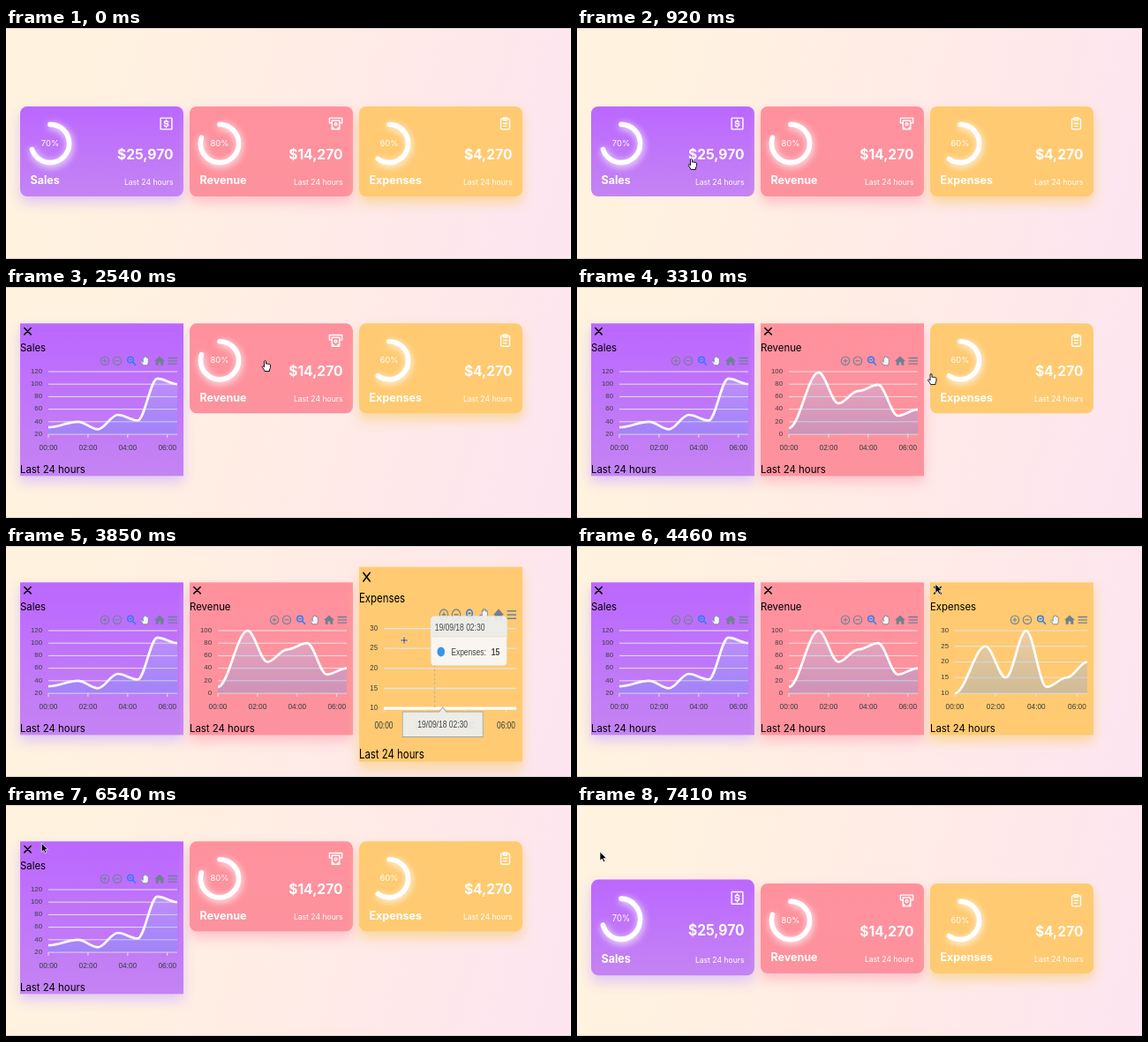
These frames come from a looping animation (640 by 262 pixels, 7.52 s). An HTML page:

```html
<!DOCTYPE html>
<html lang="en">
<head>
<meta charset="utf-8">
<title>Dashboard cards</title>
<style>
  html, body { margin: 0; width: 100%; height: 100%; overflow: hidden; }
  body { background: linear-gradient(106deg, #fff2df 16%, #ffeae8 62%, #fde5f1 100%); }
  svg { display: block; width: 100%; height: 100%; font-family: Inter, sans-serif; }
  .chart { font-family: "Liberation Sans", Arial, sans-serif; fill: #373d3f; }
  .ring { filter: drop-shadow(1.4px 2.8px 4.2px #fff); }
</style>
</head>
<body>
<svg id="stage" viewBox="0 0 640 262"></svg>
<script>
const LOOP = 7520, MOVE = 450, W = 185, SHUT = 102, OPEN = 173;
const ROW_LOW = 89, ROW_HIGH = 41.3;
const HOURS = [0, 1.5, 2.5, 3.5, 4.5, 5.5, 6.5];
const PLOT = { top: 54.7, bottom: 125.7, right: 178 };

const cards = [
  { name: 'Sales', amount: '$25,970', pct: 70, x: 16, fill: ['#bb67ff', '#c484f3'], shadow: '#e0c6f5',
    data: [31, 40, 28, 51, 42, 109, 100], min: 20, max: 120, step: 20, left: 32, tipW: 70,
    open: 1387, close: 7138, tipEnd: 1850,
    icon: '<rect x="3" y="3" width="18" height="18" rx="1"/><path d="M12 6v2M12 16v2M15 9.5A2 2 0 0 0 13 8H11a2 2 0 0 0 0 4h2a2 2 0 0 1 0 4H11a2 2 0 0 1-2-1.5"/>' },
  { name: 'Revenue', amount: '$14,270', pct: 80, x: 208, fill: ['#ff919d', '#fc929d'], shadow: '#fdc0c7',
    data: [10, 100, 50, 70, 80, 30, 40], min: 0, max: 100, step: 20, left: 32, tipW: 83,
    open: 2650, close: 5880, tipEnd: 2950,
    icon: '<path d="M5 11H2V3H22V11H19M6 7H18V21H6ZM6 18a3 3 0 0 1 3 3M18 18a3 3 0 0 0-3 3"/><circle cx="12" cy="13" r="2"/>' },
  { name: 'Expenses', amount: '$4,270', pct: 60, x: 400, fill: ['#ffca71', '#ffca71'], shadow: '#f9d59b',
    data: [10, 25, 15, 30, 12, 15, 20], min: 10, max: 30, step: 5, left: 28, tipW: 86,
    open: 3745, close: 4880, tipEnd: 4000,
    icon: '<rect x="5" y="4" width="14" height="17" rx="2"/><path d="M9 2.5h6v4H9zM9 11.5h6M9 16h5"/>' }
];

// time, x, y of the pointer's hot spot
const route = [
  [80, 330, 209], [770, 130, 150], [920, 130, 150], [1380, 96, 135], [1500, 96, 135],
  [2400, 294, 85], [2660, 294, 85], [3700, 451, 107], [3860, 451, 107], [4400, 406, 43],
  [4690, 406, 44], [4770, 406, 47], [4900, 406, 47], [5600, 214, 48], [5690, 218, 49],
  [5770, 222, 49], [5900, 222, 49], [6620, 34, 43], [7130, 24, 49], [7410, 26, 53], [7520, 27, 54]
];

const clamp = v => Math.max(0, Math.min(1, v));
const mix = (a, b, p) => a + (b - a) * p;
const smooth = p => p * p * (3 - 2 * p);

// cubic-bezier(.4, 0, .1, 1)
function ease(x) {
  if (x <= 0) return 0;
  if (x >= 1) return 1;
  let lo = 0, hi = 1;
  for (let i = 0; i < 20; i++) {
    const u = (lo + hi) / 2, v = 1 - u;
    if (1.2 * v * v * u + .3 * v * u * u + u * u * u < x) lo = u; else hi = u;
  }
  return lo * lo * (3 - 2 * lo);
}

const text = (x, y, size, str, attrs = '') =>
  `<text x="${x}" y="${y}" font-size="${size}" ${attrs}>${str}</text>`;
const hourX = (c, h) => c.left + (PLOT.right - c.left) * h / 6.5;
const valueY = (c, v) => mix(PLOT.bottom, PLOT.top, (v - c.min) / (c.max - c.min));

function curve(c, grow) {
  let d = '', px, py;
  c.data.forEach((v, i) => {
    const x = hourX(c, HOURS[i]), y = mix(PLOT.bottom, valueY(c, v), grow), k = (x - px) * .35;
    d += i ? `C${px + k} ${py} ${x - k} ${y} ${x} ${y}` : `M${x} ${y}`;
    px = x; py = y;
  });
  return d;
}

function panel(c, h, r) {
  return `<rect class="panel" width="${W}" height="${h}" rx="${r}" fill="url(#bg${c.name})"/>`;
}

function compact(c) {
  return `<g class="compact">${panel(c, SHUT, 8)}<g fill="#fff">
    <circle class="ring" cx="34" cy="42" r="21.6" fill="none" stroke="#fff" stroke-width="5.6" stroke-linecap="round"
      pathLength="100" stroke-dasharray="${c.pct} 100" transform="rotate(-90 34 42)" style="filter:none"/>
    ${text(34, 44.6, 9.4, c.pct + '%', 'text-anchor="middle"')}
    ${text(11.5, 88.3, 12.5, c.name, 'font-weight="700"')}
    ${text(173.5, 60, 15.6, c.amount, 'font-weight="700" text-anchor="end"')}
    ${text(173.5, 88.6, 8.6, 'Last 24 hours', 'text-anchor="end"')}
    <g transform="translate(157 11) scale(.71)" fill="none" stroke="#fff" stroke-width="2" stroke-linecap="round" stroke-linejoin="round">${c.icon}</g>
    </g></g>`.replace('<circle class="ring"', '<g class="ring"><circle').replace(' style="filter:none"/>', '/></g>');
}

const toolbar = `<g fill="none" stroke="#6e8192" stroke-width="1.1">
  <circle cx="96" cy="42.4" r="4.7"/><path d="M93.5 42.4h5M96 39.9v5"/>
  <circle cx="110" cy="42.4" r="4.7"/><path d="M107.5 42.4h5"/>
  <g stroke="#2b7ff5" stroke-width="1.5"><circle cx="125" cy="41.2" r="3.3"/><path d="M127.4 43.6l3.6 3.8M123.5 41.2h3"/></g>
  <path d="M139.5 47.5l-3-4 1-.8 1.7 1.3v-5q.9-.9 1.5 0v-1.4q.9-.9 1.6 0v.8q.9-.8 1.5 0v1q.9-.7 1.5 0v5l-1 3.1z" fill="#f4f4f6" stroke-width=".8"/>
  <path d="M158 37.3l6 5.4h-1.7v4.7h-3v-3.3h-2.6v3.3h-3v-4.7H152z" fill="#6e8192" stroke="none"/>
  <path d="M167.5 39.2h10.5M167.5 42.5h10.5M167.5 45.8h10.5" stroke-width="1.3"/></g>`;

function expanded(c) {
  let grid = '', labels = '';
  for (let v = c.min; v <= c.max; v += c.step) {
    const y = valueY(c, v);
    grid += `M${c.left} ${y}H${PLOT.right}`;
    labels += text(c.left - 7, y + 1.8, 7.8, v, 'text-anchor="end"');
  }
  for (let h = 0; h <= 6; h += 2) {
    grid += `M${hourX(c, h)} ${PLOT.bottom}v4`;
    labels += text(hourX(c, h), 144, 8.3, `0${h}:00`, 'text-anchor="middle"');
  }
  const tx = hourX(c, 2.5), stamp = '19/09/18 02:30';
  return `<g class="expanded">${panel(c, OPEN, 0)}
    <path d="M4.8 5.2l7.4 7.4M12.2 5.2l-7.4 7.4" stroke="#000" stroke-width="1.5" stroke-linecap="round"/>
    ${text(0, 31.4, 11.4, c.name)}${text(0, 170.2, 11.4, 'Last 24 hours')}
    ${toolbar}
    <g class="chart"><path d="${grid}" stroke="#e6e3e6"/>${labels}
      <path class="area" fill="url(#area)"/>
      <path class="line" fill="none" stroke="#fff" stroke-width="2.7"/>
      <g class="tip">
        <path d="M${tx} ${PLOT.top}V${PLOT.bottom}" stroke="#a9a3ad" stroke-width=".8" stroke-dasharray="2 2"/>
        <path d="M${tx - 36.5} 128.7h41.5l4-4 4 4h41.5v22.3h-91z" fill="#eceff1" stroke="#90a4ae" stroke-width=".8"/>
        ${text(tx + 9, 143, 8.5, stamp, 'text-anchor="middle"')}
        <g class="box"><rect width="${c.tipW}" height="43.6" rx="3.5" fill="#fafafa" stroke="#e0e0e0" stroke-width=".7"/>
          <path d="M0 18V3.5Q0 0 3.5 0H${c.tipW - 3.5}q3.5 0 3.5 3.5V18z" fill="#eceff1"/>
          <path d="M0 18h${c.tipW}" stroke="#ddd" stroke-width=".7"/>
          ${text(4.5, 12.7, 8.5, stamp)}
          <circle cx="11.5" cy="31.5" r="4.3" fill="#2b90ee"/>
          ${text(23, 34.5, 8.5, `${c.name}: <tspan dx="3.5" font-weight="700">${c.data[2]}</tspan>`)}
        </g>
      </g>
    </g></g>`;
}

const stage = document.getElementById('stage');
stage.innerHTML = `<defs>
    <linearGradient id="area" gradientUnits="userSpaceOnUse" x1="0" x2="0" y1="${PLOT.top}" y2="${PLOT.bottom}">
      <stop stop-color="#d0d4ff" stop-opacity=".32"/><stop offset="1" stop-color="#5096ff" stop-opacity=".27"/></linearGradient>
    ${cards.map(c => `<linearGradient id="bg${c.name}" x2="0" y2="1"><stop stop-color="${c.fill[0]}"/>
      <stop offset="1" stop-color="${c.fill[1]}"/></linearGradient>`).join('')}
  </defs>
  <path d="M0 .5H640M0 261.5H640" stroke="#d9d5d6"/>
  ${cards.map(c => `<g>${compact(c)}${expanded(c)}</g>`).join('')}
  <g id="pointer">
    <path class="arrow" d="M0 0V10.2L2.4 8 4 11.6 5.7 10.8 4.2 7.4H7.4Z" fill="#000" stroke="#fff" stroke-width=".7"/>
    <path class="hand" d="M-2 8.5l-2-3 .9-.9 1.6 1.2V-1q1-1.2 2 0v3.2q1-.7 1.8.2 1-.6 1.7.3 1-.4 1.5.5v3.2l-1 2.6v1.5H-1z" fill="#fff" stroke="#000" stroke-width=".9"/>
    <g class="cross"><path d="M-4.5 0h9M0-4.5v9" stroke="#fff" stroke-width="2"/><path d="M-4 0h8M0-4v8" stroke="#222" stroke-width=".9"/></g>
  </g>`;

const show = (el, on) => el.setAttribute('display', on ? 'inline' : 'none');
const place = (el, x, y, s = 1) => el.setAttribute('transform', `translate(${x} ${y}) scale(1 ${s})`);
const pointer = document.getElementById('pointer');
const groups = [...stage.children].slice(2, 5);
cards.forEach((c, i) => {
  const find = q => groups[i].querySelector(q);
  c.el = { compact: find('.compact'), expanded: find('.expanded'), area: find('.area'),
    line: find('.line'), tip: find('.tip'), box: find('.box'), panels: groups[i].querySelectorAll('.panel') };
});

function pointerAt(t) {
  const i = Math.max(1, route.findIndex(k => k[0] > t));
  const [t0, x0, y0] = route[i - 1], [t1, x1, y1] = route[i];
  const p = smooth(clamp((t - t0) / (t1 - t0)));
  return [mix(x0, x1, p), mix(y0, y1, p)];
}

function draw(t) {
  const [mx, my] = pointerAt(t);
  const row = t >= cards[0].open && t < cards[0].close ? ROW_HIGH : ROW_LOW;
  let shape = 'arrow';

  for (const c of cards) {
    const { el } = c, isOpen = t >= c.open && t < c.close;
    const over = t >= 80 && mx >= c.x && mx <= c.x + W;
    let hover = false;
    show(el.compact, !isOpen);
    show(el.expanded, isOpen);

    if (isOpen) {
      // the stretch is left over from the panel's size before the chart appears
      const age = t - c.open, rest = 1 - ease(age / MOVE), s = 1 + .37 * rest;
      const top = ROW_HIGH + OPEN / 2 + 8.5 * rest - OPEN / 2 * s;
      place(el.expanded, c.x, top, s);
      const d = curve(c, smooth(clamp((age - 120) / 580)));
      el.line.setAttribute('d', d);
      el.area.setAttribute('d', `${d}V${PLOT.bottom}H${c.left}Z`);
      const fade = clamp(age / 115);
      el.tip.setAttribute('opacity', Math.min(fade, clamp((c.tipEnd + 150 - t) / 150)));
      place(el.box, 25 + 61 * fade, 57.7 - 15 * fade);
      const y = (my - top) / s, x = mx - c.x;
      if (y > PLOT.top - 4 && y < PLOT.bottom && x > c.left - 6 && x < PLOT.right) shape = 'cross';
    } else {
      const p = t < c.close ? 1 : ease((t - c.close) / MOVE);
      const top = mix(ROW_HIGH, row, p), h = mix(OPEN, SHUT, p);
      place(el.compact, c.x, top, h / SHUT);
      hover = over && my > top && my < top + h;
      if (hover) shape = 'hand';
    }
    el.panels.forEach(r => r.style.filter = hover ? 'none' : `drop-shadow(0 7px 7px ${c.shadow})`);
  }

  show(pointer, t >= 80);
  place(pointer, mx, my);
  for (const el of pointer.children) show(el, el.getAttribute('class') === shape);
}

const start = performance.now();
function frame() {
  draw((performance.now() - start) % LOOP);
  requestAnimationFrame(frame);
}
frame();
</script>
</body>
</html>
```
